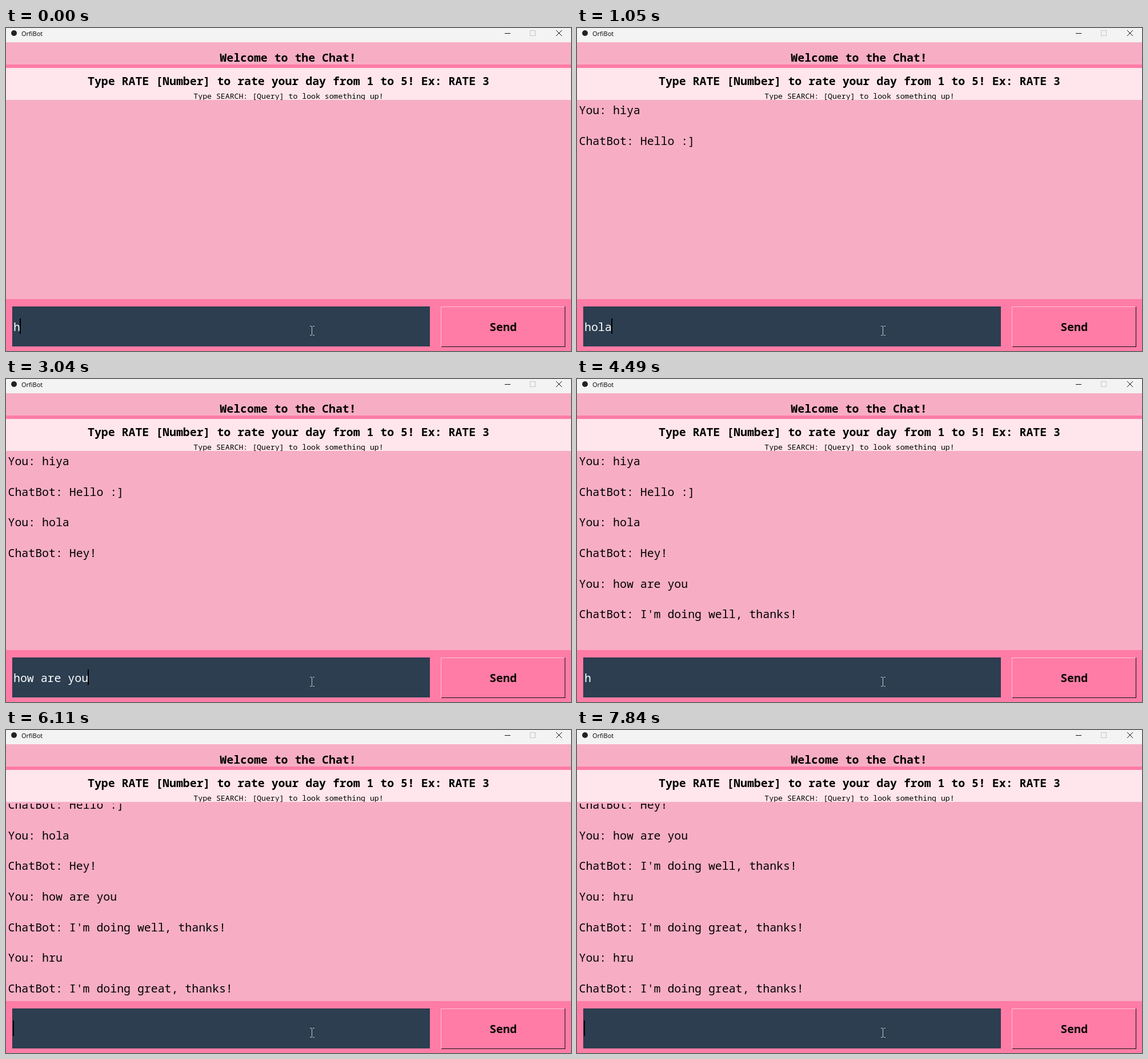
Recreate the animation shown at these times as an HTML page. Size 989 by 566 pixels, loop 7990 ms.

```html
<!DOCTYPE html>
<html lang="en">
<head>
<meta charset="utf-8">
<title>Chat window</title>
<style>
  html, body { margin: 0; width: 100%; height: 100%; overflow: hidden; background: #f7aec5; }
  svg { display: block; width: 989px; height: 566px; }
  text { font: 500 19.86px "Noto Sans Mono", monospace; white-space: pre; }
  .bold { font-weight: 600; text-anchor: middle; }
  .small { font-size: 13.2px; text-anchor: middle; }
  .caption { font: 11px "Open Sans", sans-serif; }
  .line { fill: none; shape-rendering: crispEdges; }
</style>
</head>
<body>
<svg viewBox="0 0 989 566">
  <clipPath id="logArea"><rect y="129" width="989" height="344"/></clipPath>
  <clipPath id="hintArea"><rect y="70" width="989" height="56"/></clipPath>

  <rect width="989" height="566" fill="#f7aec5"/>
  <g clip-path="url(#logArea)"><g id="log"></g></g>

  <rect width="989" height="25" fill="#f3f3f3"/>
  <circle cx="14" cy="9" r="5" fill="#222"/>
  <text class="caption" x="27" y="14">OrfiBot</text>
  <path class="line" d="M873 9.5h10" stroke="#111"/>
  <path class="line" d="M917.5 4.5h9v9h-9z" stroke="#c6c6c6"/>
  <path d="M963 4l10 10m0-10l-10 10" stroke="#111" fill="none"/>

  <text class="bold" x="493.5" y="59">Welcome to the Chat!</text>
  <rect y="64" width="989" height="6" fill="#ff7ca6"/>
  <rect y="70" width="989" height="56" fill="#fee6ec"/>
  <g clip-path="url(#hintArea)">
    <text class="bold" x="494.5" y="100">Type RATE [Number] to rate your day from 1 to 5! Ex: RATE 3</text>
    <text class="small" x="494.5" y="124">Type SEARCH: [Query] to look something up!</text>
  </g>

  <rect y="475" width="989" height="91" fill="#ff7ca6"/>
  <rect x="11" y="488" width="731" height="70" fill="#2c3e50"/>
  <path class="line" d="M11.5 558V488.5H742" stroke="#243342"/>
  <text id="entry" x="13" y="531" fill="#fff"></text>
  <rect id="caret" y="509" width="2" height="27"/>
  <path class="line" d="M532 522.5h3m2 0h3M535.5 523v15M532 538.5h3m2 0h3" stroke="#c9ced3"/>

  <path class="line" d="M761.5 559V488.5H979" stroke="#ffc4d6"/>
  <path class="line" d="M762 558.5H978.5V488" stroke="#111"/>
  <text class="bold" x="870" y="531">Send</text>
</svg>
<script>
const LOOP = 7990, ADVANCE = 11.915, ROW = 53.65;

// [time, entry content]
const typing = [
  [0, "h"], [130, "hi"], [270, "hiy"], [400, "hiya"], [530, ""],
  [660, "h"], [790, "ho"], [920, "hol"], [1050, "hola"],
  [1580, "h"], [1720, "ho"], [1850, "how"], [1980, "how "], [2110, "how a"],
  [2250, "how ar"], [2380, "how are "], [2910, "how are y"], [3040, "how are you"],
  [3570, ""], [4490, "h"], [4630, "hr"], [5290, "hru"],
  [6110, ""], [6650, "h"], [6780, "hr"], [6910, "hru"], [7040, ""]
];

// [time, message, reply]
const exchanges = [
  [530, "hiya", "Hello :]"],
  [1580, "hola", "Hey!"],
  [3570, "how are you", "I'm doing well, thanks!"],
  [6110, "hru", "I'm doing great, thanks!"],
  [7040, "hru", "I'm doing great, thanks!"]
];

// Spans in which the blinking caret is hidden
const caretHidden = [
  [790, 1050], [1720, 1980], [2640, 2910], [3570, 3830],
  [4490, 4760], [5420, 5690], [6380, 6650], [7440, 7840]
];

const byId = id => document.getElementById(id);
const log = byId("log"), entry = byId("entry"), caret = byId("caret");

const rows = exchanges.flatMap(([time, message, reply]) =>
  [[time, "You: " + message], [time, "ChatBot: " + reply]]
).map(([time, content], i) => {
  const node = document.createElementNS("http://www.w3.org/2000/svg", "text");
  node.textContent = content;
  node.setAttribute("x", 3.5);
  node.setAttribute("y", 151 + i * ROW);
  log.append(node);
  return { time, node };
});

function draw(t) {
  const content = typing.findLast(([time]) => time <= t)[1];
  entry.textContent = content;
  caret.setAttribute("x", Math.round(12 + content.length * ADVANCE));
  const hidden = caretHidden.some(([from, to]) => t >= from && t < to);
  caret.setAttribute("visibility", hidden ? "hidden" : "visible");

  let shown = 0;
  for (const { time, node } of rows) {
    const visible = time <= t;
    node.setAttribute("visibility", visible ? "visible" : "hidden");
    shown += visible;
  }
  const scroll = Math.max(0, shown * ROW - 362.6);
  log.setAttribute("transform", `translate(0 ${-scroll})`);
}

function tick() {
  draw(performance.now() % LOOP);
  requestAnimationFrame(tick);
}
tick();
</script>
</body>
</html>
```
